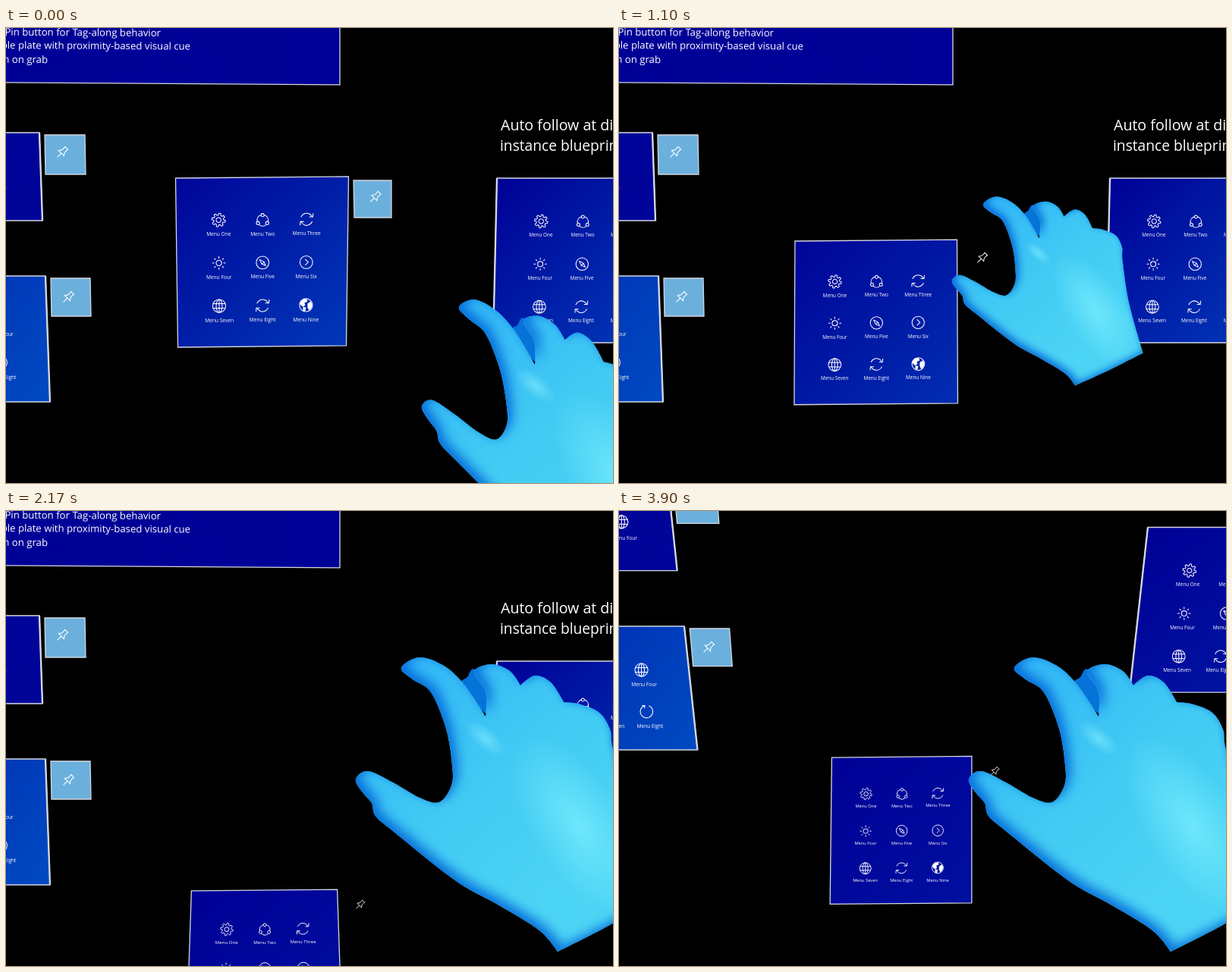
Animation, 800 px wide and 600 px high, one loop 3980 ms. Source, as an HTML page with a canvas:

```html
<!DOCTYPE html>
<html lang="en">
<head>
<meta charset="utf-8">
<title>Tag-along menu</title>
<style>
html, body { margin: 0; width: 100%; height: 100%; overflow: hidden; background: #000; }
canvas { display: block; width: 800px; height: 600px; }
</style>
</head>
<body>
<canvas id="stage" width="800" height="600"></canvas>
<script>
const ctx = document.getElementById('stage').getContext('2d');
const LOOP = 3980, STEPS = 51;
const FONT = '"Open Sans", "Noto Sans", sans-serif';
const TAU = Math.PI * 2;

const clamp = x => Math.max(0, Math.min(1, x));
const lerp = (a, b, t) => a + (b - a) * t;
const smooth = x => x * x * (3 - 2 * x);
const easeOut = x => 1 - (1 - x) * (1 - x);
const linear = x => x;
const blue = g => `rgb(0,${Math.round(g)},${Math.round(150 + g * 0.6)})`;

// ---- camera: 0 looks ahead, 1 has tilted down ----
let tilt = 0;
function project(x, y) {
  const dx = 36 + (x - 316) * (0.095 - 0.000267 * y);
  const dy = -175 - 0.0001 * (y - 320) ** 2;
  return [x + tilt * dx, y + tilt * dy];
}

// Corners TL, TR, BR, BL; leanL and leanR move the lower corners sideways.
function box(x, y, w, h, leanL = 0, leanR = 0, slope = 0) {
  const drop = w * slope;
  return [project(x, y), project(x + w, y + drop),
    project(x + w + leanR, y + h + drop), project(x + leanL, y + h)];
}

const between = (p, q, t) => [lerp(p[0], q[0], t), lerp(p[1], q[1], t)];
const inside = (q, u, v) => between(between(q[0], q[1], u), between(q[3], q[2], u), v);

function trace(points, close) {
  ctx.beginPath();
  points.forEach(p => ctx.lineTo(...p));
  if (close) ctx.closePath();
}

function plate(q, fill = '#6bb0dc') {
  trace(q, true);
  ctx.fillStyle = fill;
  ctx.fill();
  ctx.strokeStyle = '#d4d8e2';
  ctx.lineWidth = 1.3;
  ctx.stroke();
}

function panel(q, g0, g1, thickEdge) {
  const grad = ctx.createLinearGradient(...q[0], ...q[2]);
  grad.addColorStop(0, blue(g0));
  grad.addColorStop(1, blue(g1));
  plate(q, grad);
  if (!thickEdge) return;
  trace(thickEdge === 'right' ? [q[1], q[2]] : [q[0], q[3]]);
  ctx.lineWidth = 2.3;
  ctx.stroke();
}

// ---- icons, drawn around the origin with a radius of about 9 ----
function ring(r, x = 0, y = 0) {
  ctx.beginPath();
  ctx.arc(x, y, r, 0, TAU);
  ctx.stroke();
}
function path(p) {
  ctx.beginPath();
  for (let i = 0; i < p.length; i += 2) ctx.lineTo(p[i], p[i + 1]);
}
function line(...p) {
  path(p);
  ctx.stroke();
}
function blot(...p) {
  path(p);
  ctx.fill();
}

const icons = {
  gear() {
    ctx.beginPath();
    for (let i = 0; i < 96; i++) {
      const a = i / 96 * TAU, r = 7.7 + 1.3 * Math.tanh(3 * Math.sin(8 * a));
      ctx.lineTo(r * Math.cos(a), r * Math.sin(a));
    }
    ctx.closePath();
    ctx.stroke();
    ring(3.2);
  },
  share() {
    for (let i = 0; i < 3; i++) {
      const a = -Math.PI / 2 + i * TAU / 3;
      ring(2.1, 7 * Math.cos(a), 1 + 7 * Math.sin(a));
      ctx.beginPath();
      ctx.arc(0, 1, 7.4, a + 0.35, a + TAU / 3 - 0.35);
      ctx.stroke();
    }
  },
  sync() {
    for (const s of [1, -1]) {
      ctx.beginPath();
      ctx.arc(0, 0, 8, s > 0 ? 3.5 : 0.36, s > 0 ? 5.9 : 2.76);
      ctx.stroke();
      line(8.6 * s, -8 * s, 8.2 * s, -3.2 * s, 3.6 * s, -3.2 * s);
    }
  },
  sun() {
    ring(3.6);
    for (let i = 0; i < 8; i++) {
      const c = Math.cos(i * TAU / 8), s = Math.sin(i * TAU / 8);
      line(6 * c, 6 * s, 8.8 * c, 8.8 * s);
    }
  },
  compass() {
    ring(8.4);
    line(-4, -4, 2, -1, 4, 4, -1, 2, -4, -4);
    line(-1, 2, 2, -1);
  },
  next() {
    ring(8.4);
    line(-1.5, -4, 2.5, 0, -1.5, 4);
  },
  globe() {
    ring(8.6);
    ctx.beginPath();
    ctx.ellipse(0, 0, 4, 8.6, 0, 0, TAU);
    ctx.stroke();
    line(0, -8.6, 0, 8.6);
    line(-8, -3, 8, -3);
    line(-8, 3, 8, 3);
  },
  earth() {
    ring(8.6);
    blot(-8, -3, -4, -8, 1, -8, 2, -5, -2, -3, -1, 0, -4, 2, -7, 0);
    blot(2, -2, 6, -5, 8.4, -1, 7, 4, 4, 7, 2, 3);
    blot(-4, 2, 0, 3, -1, 8, -4, 7);
  },
  loop() {
    ctx.beginPath();
    ctx.arc(0, 0, 8.3, -1.2, 4.4);
    ctx.stroke();
    line(-6, -8, -2.5, -8, -2.5, -4.5);
  },
  pin() {
    ctx.rotate(Math.PI / 4);
    line(-3.3, -8, 3.3, -8);
    line(-2.4, -8, -2.4, -2, -5, 1.6, 5, 1.6, 2.4, -2, 2.4, -8);
    line(0, 1.6, 0, 9);
  }
};

function icon(name, [x, y], k = 1) {
  ctx.save();
  ctx.translate(x, y);
  ctx.scale(k, k);
  ctx.strokeStyle = ctx.fillStyle = '#fff';
  ctx.lineWidth = 1.05;
  icons[name]();
  ctx.restore();
}

function text(str, [x, y], size, align, turn = 0) {
  ctx.save();
  ctx.translate(x, y);
  ctx.rotate(turn);
  ctx.font = `${size}px ${FONT}`;
  ctx.textAlign = align;
  ctx.fillStyle = '#fff';
  ctx.fillText(str, 0, 0);
  ctx.restore();
}
const label = (word, [x, y], k = 1) => text('Menu ' + word, [x, y + 2.3 * k], 6.6 * k, 'center');

const words = ['One', 'Two', 'Three', 'Four', 'Five', 'Six', 'Seven', 'Eight', 'Nine'];
const kinds = ['gear', 'share', 'sync', 'sun', 'compass', 'next', 'globe', 'sync', 'earth'];

function menuGrid(q, u0, v0, du, dv) {
  const k = (q[3][1] - q[0][1]) / 223;
  words.forEach((word, i) => {
    const u = u0 + (i % 3) * du, v = v0 + Math.floor(i / 3) * dv;
    icon(kinds[i], inside(q, u, v), k);
    label(word, inside(q, u, v + 0.084), k);
  });
}

// ---- panels fixed in the room ----
function room() {
  panel(box(-400, -200, 840, 269, 0, 0, 0.007), 0, 2);
  const notes = ['Pin button for Tag-along behavior',
    'Grabbable plate with proximity-based visual cue', 'Visible border shown on grab'];
  [204, 243, 55].forEach((end, i) =>
    text(notes[i], project(end, 11 + 17.6 * i), 13.2, 'right', 0.006));

  panel(box(-180, 138, 224, 116, 0, 4), 0, 5, 'right');
  icon('globe', project(-18, 191));
  label('Four', project(-16, 212));
  plate(box(51, 141, 53, 52, 1, 1));
  icon('pin', project(74, 164));

  panel(box(-180, 327, 232, 166, 0, 6), 38, 74, 'right');
  icon('globe', project(-9, 385));
  label('Four', project(-7, 404));
  icon('loop', project(-7, 441));
  label('Eight', project(-4, 460.5));
  label('Seven', project(-58, 460.5));
  plate(box(59, 330, 52, 50, 1, 1));
  icon('pin', project(82, 355));

  const right = box(647, 198, 226, 217, -5, -3);
  panel(right, 0, lerp(60, 24, tilt), 'left');
  menuGrid(right, 0.263, 0.262, 0.243, 0.26);
  text('Auto follow at distance', project(652, 134.5), 19.6, 'left');
  text('instance blueprint', project(651, 161.5), 19.2, 'left');
}

// ---- the menu that drops and follows once its pin is pressed ----
const PRESS = 13;
function tagAlong(step) {
  const fall = 1 - Math.exp(-0.317 * Math.max(0, step - PRESS));
  const shrink = fall ** 0.7;
  const w = lerp(228, 192, shrink), h = lerp(223, 205, shrink);
  const x = lerp(337.5, 340.5, shrink) - w / 2 - 3 * tilt;
  const y = lerp(198, 503.5, fall), taper = lerp(-3, 7, shrink);
  const q = box(x, y, w, h, -taper, taper, -0.009);
  panel(q, lerp(5, 0, fall), lerp(56, 16, fall));
  menuGrid(q, 0.247, 0.25, 0.256, 0.254);
  if (step < PRESS) plate(box(458, 201, 50, 49, 1, 0));
  const [cx, cy] = q[1];
  icon('pin', [cx + lerp(35, 30, shrink), cy + lerp(27, 20, shrink)], lerp(1, 0.8, shrink));
}

// ---- hand: key points, clockwise from the thumb; a third value marks a corner ----
const TIP = [461, 354];
const OUTLINE = {
  thumb: [[482, 385], [470, 371], [461, 354], [477, 343], [510, 358], [545, 378], [571, 384], [587, 362], [588, 335]],
  index: [[580, 287], [560, 239], [536, 222], [521, 207], [545, 193], [577, 204], [604, 229], [632, 271, 1]],
  middle: [[632, 238], [617, 212], [640, 202], [664, 211], [678, 230, 1]],
  ring: [[697, 217], [718, 226], [735, 252, 1]],
  pinky: [[757, 255], [782, 266], [796, 288], [800, 315]],
  wrist: [[822, 400], [864, 507, 1], [790, 549], [727, 581, 1]],
  heel: [[703, 553], [650, 520], [592, 487], [510, 422], [487, 402]]
};
const FOLD = [[600, 230], [608, 219], [618, 209], [640, 240], [635, 263], [627, 263]];

// step, easing into it, then: distance, thumb tip x and y, twist
const moves = [
  [0, linear, [0, 548, 499, 1]],
  [5, linear, [0.42, 492, 373, 0]],
  [14, easeOut, [1, 439, 333, 0]],
  [21, smooth, [0, 461, 354, 0]],
  [STEPS, linear, [0, 461, 354, 0]]
];

function handPose(step) {
  const i = Math.max(1, moves.findIndex(m => m[0] >= step));
  const [from, , a] = moves[i - 1], [to, ease, b] = moves[i];
  const t = ease(clamp((step - from) / (to - from)));
  return a.map((v, j) => lerp(v, b[j], t));
}

// Closed smooth curve through the points.
function curve(points) {
  const shape = new Path2D(), n = points.length;
  const pt = i => points[(i + n) % n];
  const slope = (i, axis) => pt(i)[2] ? 0 : (pt(i + 1)[axis] - pt(i - 1)[axis]) / 6;
  shape.moveTo(points[0][0], points[0][1]);
  for (let i = 0; i < n; i++) {
    const [ax, ay] = pt(i), [bx, by] = pt(i + 1);
    shape.bezierCurveTo(ax + slope(i, 0), ay + slope(i, 1),
      bx - slope(i + 1, 0), by - slope(i + 1, 1), bx, by);
  }
  shape.closePath();
  return shape;
}

function glow([x, y], r, color, squash, turn) {
  ctx.save();
  ctx.translate(x, y);
  ctx.rotate(turn);
  ctx.scale(1, squash);
  const g = ctx.createRadialGradient(0, 0, 0, 0, 0, r);
  g.addColorStop(0, `rgba(${color},0.85)`);
  g.addColorStop(1, `rgba(${color},0)`);
  ctx.fillStyle = g;
  ctx.fillRect(-r, -r, 2 * r, 2 * r);
  ctx.restore();
}

function hand(step) {
  const [far, tx, ty, twist] = handPose(step);
  const k = lerp(1, 0.64, far);
  const place = ([px, py, corner]) => {
    const rx = px - TIP[0], ry = py - TIP[1];
    const s = lerp(1, 0.655 - 0.0002 * ry, far);
    const x = rx * s, y = ry * s;
    return [tx + x + twist * (0.028 * y - 0.115 * x), ty + y + twist * (0.138 * x - 0.053 * y), corner];
  };
  const spot = (x, y) => place([x, y]).slice(0, 2);

  // folded side of the middle finger
  ctx.fillStyle = '#0673d8';
  ctx.fill(curve(FOLD.map(place)));

  const shape = curve(Object.values(OUTLINE).flat().map(place));
  const skin = ctx.createLinearGradient(...spot(540, 200), ...spot(770, 470));
  skin.addColorStop(0, '#31b6f6');
  skin.addColorStop(0.5, '#41caf3');
  skin.addColorStop(1, '#4cd4f5');

  ctx.save();
  ctx.clip(shape);
  ctx.fillStyle = skin;
  ctx.fill(shape);
  glow(spot(755, 415), 135 * k, '116,234,252', 0.45, 1);
  glow(spot(632, 300), 32 * k, '112,226,252', 0.45, 0.7);

  // soft shade along the lower left edges, a fainter one all round
  const outside = new Path2D(shape);
  outside.rect(-600, -600, 2400, 2400);
  const rim = (color, blur, shift) => {
    ctx.shadowColor = color;
    ctx.shadowBlur = blur * k;
    ctx.shadowOffsetX = shift * k;
    ctx.shadowOffsetY = -shift * k;
    ctx.fill(outside, 'evenodd');
  };
  rim('rgba(0,98,214,0.9)', 16, 6);
  rim('rgba(8,130,240,0.4)', 9, 0);
  ctx.restore();
}

function draw(ms) {
  const step = Math.min(STEPS - 1, Math.floor(ms * STEPS / LOOP + 0.25));
  tilt = smooth(clamp((step - 33.2) / 5.37));
  ctx.fillStyle = '#000';
  ctx.fillRect(0, 0, 800, 600);
  room();
  tagAlong(step);
  hand(step);
}

const began = performance.now();
function tick() {
  draw((performance.now() - began) % LOOP);
  requestAnimationFrame(tick);
}
tick();
</script>
</body>
</html>
```
